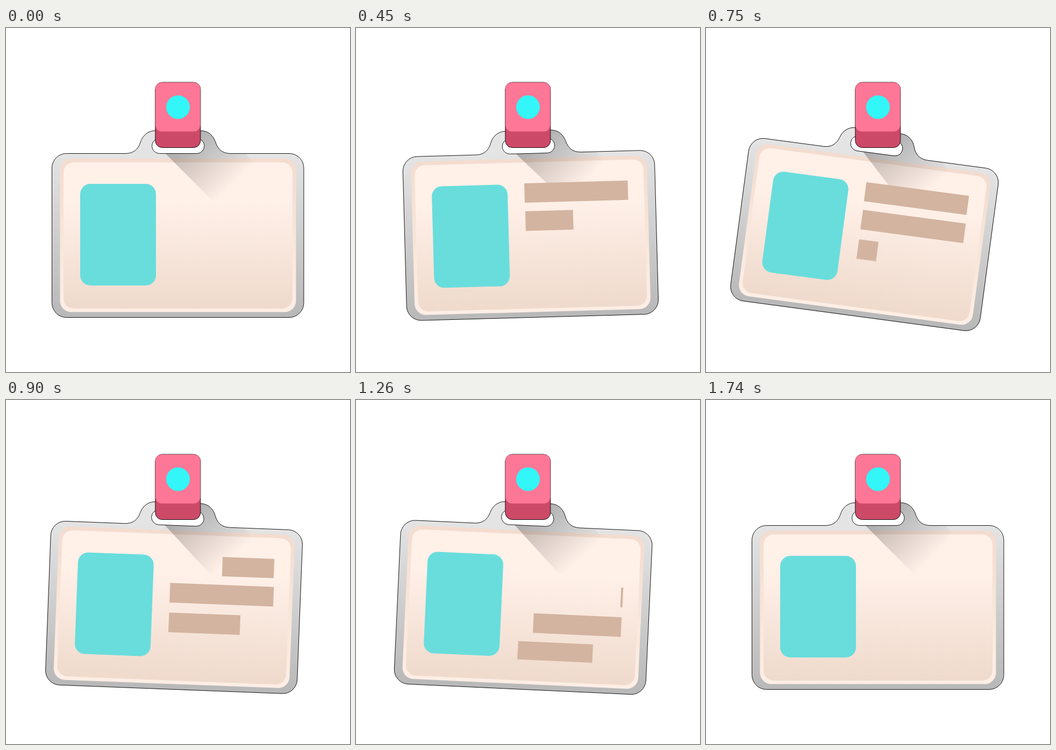
These frames come from a looping animation (640 px wide and 640 px high, 2.04 s). An HTML page:

```html
<!DOCTYPE html>
<html lang="en">
<head>
<meta charset="utf-8">
<title>Swinging badge</title>
<style>
  html, body { margin: 0; width: 100%; height: 100%; overflow: hidden; background: #fff; }
  svg { display: block; width: 100vw; height: 100vh; }
</style>
</head>
<body>
<svg viewBox="0 0 640 640">
  <defs>
    <linearGradient id="frame" gradientUnits="userSpaceOnUse" x1="0" y1="235" x2="0" y2="538">
      <stop stop-color="#e4e4e4"/><stop offset="1" stop-color="#b8b8b8"/>
    </linearGradient>
    <linearGradient id="rim" x2="0" y2="1">
      <stop stop-color="#f3dccf"/><stop offset="1" stop-color="#feeee5"/>
    </linearGradient>
    <linearGradient id="paper" x2="0" y2="1">
      <stop offset=".27" stop-color="#fff0e8"/><stop offset="1" stop-color="#efdacc"/>
    </linearGradient>
    <linearGradient id="shade" gradientUnits="userSpaceOnUse" x1="298" y1="234" x2="389" y2="325">
      <stop stop-opacity=".25"/><stop offset="1" stop-opacity="0"/>
    </linearGradient>
    <path id="shape" clip-rule="evenodd" fill-rule="evenodd" d="M112.5 233.5H222C238 233.5 246 225 250 213C254 200 264 191 278 191H362C376 191 386 200 390 213C394 225 402 233.5 418 233.5H527a27 27 0 0 1 27 27V511.500a27 27 0 0 1-27 27H112.500a27 27 0 0 1-27-27V260.500a27 27 0 0 1 27-27Z
      M285.500 205.500a14 14 0 0 0 0 28H355a14 14 0 0 0 0-28Z"/>
    <clipPath id="inside"><use href="#shape" clip-rule="evenodd"/></clipPath>
  </defs>
  <g id="card">
    <use href="#shape" fill="url(#frame)" stroke="#000" stroke-width=".9"/>
    <rect x="100.500" y="243" width="439" height="285.500" rx="21" fill="url(#rim)"/>
    <rect x="107" y="250" width="426" height="272" rx="19" fill="url(#paper)"/>
    <path d="M278 215L362 150L542 330L393 330Z" fill="url(#shade)" clip-path="url(#inside)"/>
    <rect x="138" y="290" width="141" height="189" rx="19" fill="#68dddc"/>
    <g id="bars" fill="#d3b4a0"></g>
  </g>
  <rect x="277.800" y="101" width="84" height="121.500" rx="13" fill="#cc4a68" stroke="#000" stroke-width=".9"/>
  <rect x="278" y="101.300" width="83.500" height="91.200" rx="12" fill="#ff7796"/>
  <circle cx="320" cy="147.300" r="22" fill="#33f6f8"/>
</svg>
<script>
  const LOOP = 2040, STEP = 30, END = 1740, WIPE = 300;
  // Swing: [time in ms, angle in degrees]
  const swing = [[0, 0], [340, -6], [712, 9], [1016, -2], [1332, 4], [1656, 0], [LOOP, 0]];
  // Bars: x, y, width, height, start of growing, start of shrinking
  const bars = [
    [310.5, 288.7, 192.5, 36, 20, 750],
    [311, 340.8, 193, 36.5, 312, 966],
    [311, 396, 192.5, 36.5, 693, 1215],
    [313.2, 449, 139.500, 34, 945, 1440]
  ];
  const card = document.getElementById('card');
  const group = document.getElementById('bars');
  const rects = bars.map(() =>
    group.appendChild(document.createElementNS('http://www.w3.org/2000/svg', 'rect')));

  const progress = (t, start, length) => Math.min(1, Math.max(0, (t - start) / length));

  function angleAt(t) {
    const i = swing.findIndex(key => key[0] > t);
    const [t0, a0] = swing[i - 1], [t1, a1] = swing[i];
    return a0 + (a1 - a0) * progress(t, t0, t1 - t0);
  }

  function draw(now) {
    const t = Math.min(END, Math.floor(now % LOOP / STEP) * STEP);
    card.setAttribute('transform', `rotate(${angleAt(t)} 320 198)`);
    bars.forEach(([x, y, width, height, grow, shrink], i) => {
      const left = width * progress(t, shrink, WIPE);
      const right = width * progress(t, grow, WIPE);
      const box = { x: x + left, y, width: right - left, height };
      for (const name in box) rects[i].setAttribute(name, box[name]);
    });
  }

  const begin = performance.now();
  function tick() {
    draw(performance.now() - begin);
    requestAnimationFrame(tick);
  }
  tick();
</script>
</body>
</html>
```
